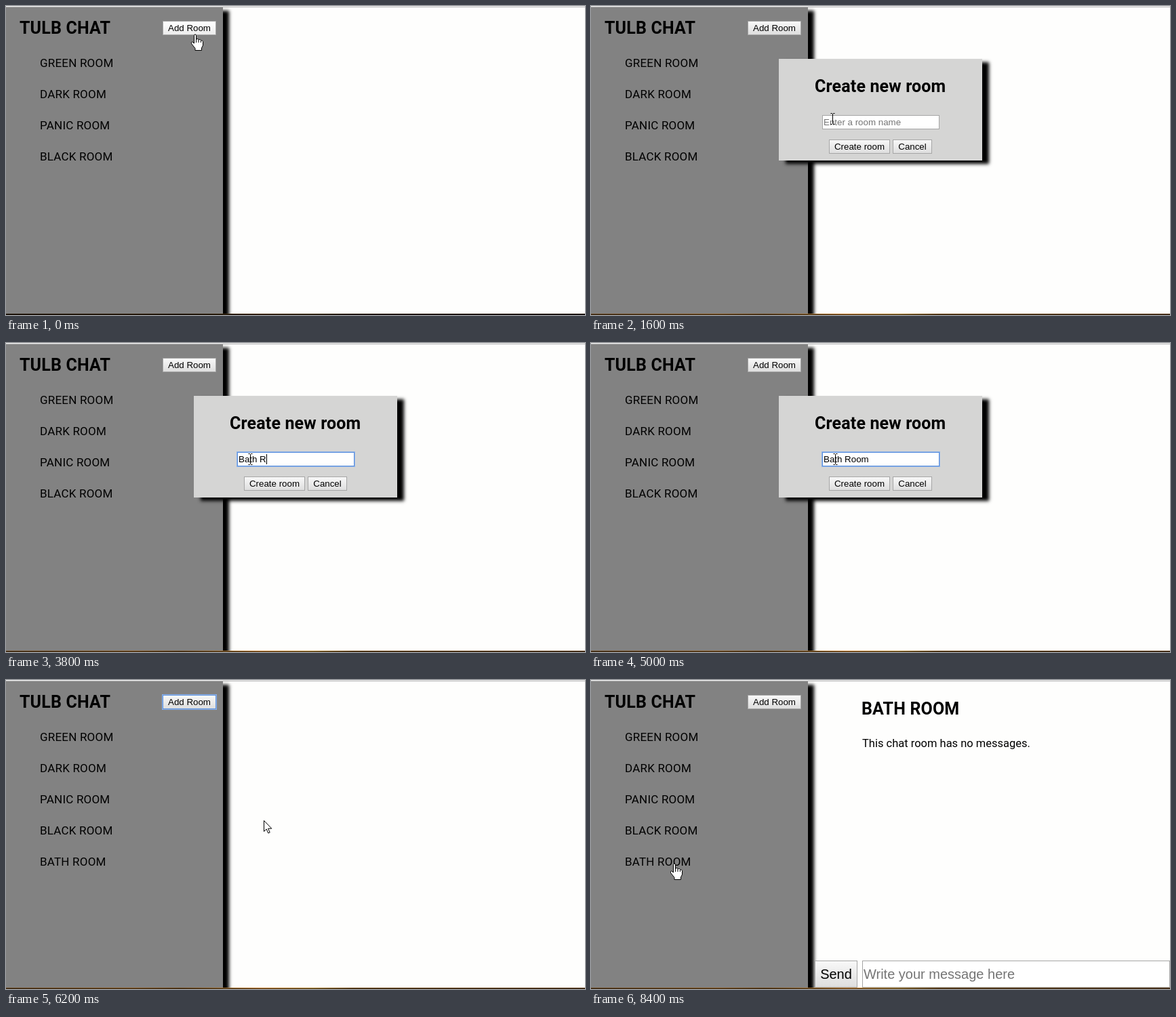
Write an HTML page that moves like this. It is 854x456 px and loops after 8800 ms.

```html
<!DOCTYPE html>
<html lang="en">
<head>
<meta charset="utf-8">
<title>Chat rooms</title>
<style>
html, body { margin: 0; width: 100%; height: 100%; overflow: hidden; background: #fefefd; }
body { position: relative; color: #000; }
body *, svg { position: absolute; box-sizing: border-box; white-space: pre; }
[hidden] { display: none; }

#topline { left: 0; top: 0; width: 854px; height: 2px; background: linear-gradient(#f4f4f4 50%, #b4b4b4 50%); }
#strip { left: 0; top: 454px; width: 854px; height: 2px;
  background: linear-gradient(transparent 50%, #0009 50%),
    linear-gradient(90deg, #6b4a26, #8a5c26 22%, #6e4a20 30%, #9a6a2c 38%, #c88438 44%, #b58a3c 53%, #7a5426 60%, #6b4a2a); }
#side { left: 0; top: 2px; width: 320px; height: 452px; background: #828282; box-shadow: 9px 5px 5px #000; }
#modal { left: 277px; top: 78px; width: 300px; height: 150px; background: #d5d5d4; box-shadow: 10px 5px 5px #000; }

h2, p { margin: 0; height: 20px; font: 17px/20px Roboto, sans-serif; }
h2 { font-weight: 600; font-size: 25px; letter-spacing: .15px; }
#side p { left: 50px; letter-spacing: .2px; }
#room p { font-size: 16.5px; }

.button, .field { font: 13.333px "Liberation Sans", Arial, sans-serif; border: 1px solid #a6a6a6; display: flex; align-items: center; }
.button { justify-content: center; background: linear-gradient(#f8f8f8, #dedede); }
.button.lit { background: linear-gradient(#fff, #ececec); }
.button.down { background: linear-gradient(#d8d8d8, #efefef); }
.field { background: #fff; padding-left: 1px; }
.field span { position: static; }
.empty { color: #757575; }
.focus { border-color: #5b8fdc; box-shadow: 0 0 0 1px #8fb3e8; }
.big { font-size: 20px; }
#caret { top: 86px; width: 1px; height: 15px; background: #000; }
#cursors svg { left: 0; top: 0; overflow: visible; }
</style>
</head>
<body>
<div id="topline"></div>
<div id="side">
  <h2 style="left:20px;top:21px">TULB CHAT</h2>
  <div id="add" class="button" style="left:231px;top:20px;width:79px;height:21px">Add Room</div>
</div>
<div id="room">
  <h2 style="left:399px;top:33px">BATH ROOM</h2>
  <p style="left:400px;top:84px">This chat room has no messages.</p>
  <div class="button big" style="left:330px;top:414px;width:63px;height:40px">Send</div>
  <div class="field big empty" style="left:400px;top:414px;width:454px;height:40px">Write your message here</div>
</div>
<div id="modal">
  <h2 style="left:53px;top:31px">Create new room</h2>
  <div id="name" class="field" style="left:64px;top:83px;width:173px;height:21px"><span id="typed"></span></div>
  <div id="caret"></div>
  <div id="create" class="button" style="left:74px;top:119px;width:90px;height:21px">Create room</div>
  <div class="button" style="left:168px;top:119px;width:58px;height:21px">Cancel</div>
</div>
<div id="strip"></div>
<div id="cursors">
  <svg id="hand" width="1" height="1" fill="#fff" stroke="#000" stroke-linejoin="round">
    <path d="M-1.5 13V1.5Q-1.5 0 0 0T1.5 1.5V8Q2 6 3.8 6.5T5 8.5Q6 6.8 7.4 7.5T8.4 9.5Q9.5 8.3 10.7 9.4T11.5 12V16L9.5 20V23.5H0V20.5L-5.5 13.5Q-6 11-4.5 10.8Z"/>
    <path d="M1.5 7V12M5 8.5V12M8.4 9.5V12" fill="none"/>
  </svg>
  <svg id="arrow" width="1" height="1" fill="#fff" stroke="#000">
    <path d="M.5 .5V16.5L4.2 13L6.8 19L9.2 18L6.6 12.2H11.8Z"/>
  </svg>
  <svg id="beam" width="1" height="1" fill="none" stroke="#000">
    <path d="M-2.5-7.5H-.5L.5-6.5L1.5-7.5H3.5M.5-6.5V7M-2.5 8.5H-.5L.5 7.5L1.5 8.5H3.5"/>
  </svg>
</div>
<script>
const LOOP = 8800;
const $ = id => document.getElementById(id);

// [time, cursor, x, y] of the pointer's hot spot
const pointer = [
  [0, 'hand', 279, 42], [200, 'hand', 277, 34], [400, 'hand', 275, 26],
  [1000, 'arrow', 284, 50], [1200, 'arrow', 310, 95], [1400, 'arrow', 338, 140],
  [1600, 'beam', 356, 166], [1800, 'beam', 360, 171],
  [5400, 'beam', 364, 177], [5600, 'arrow', 373, 196], [5800, 'arrow', 380, 207],
  [6600, 'arrow', 345, 214], [6800, 'arrow', 255, 236], [7000, 'arrow', 165, 260],
  [7200, 'hand', 123, 271]
];
// [time, letters typed]
const typing = [[0, 0], [2400, 1], [2600, 2], [3000, 3], [3200, 4], [3800, 6], [4200, 8], [4400, 9]];

const latest = (keys, t) => keys.filter(key => key[0] <= t).pop();
const between = (t, from, to) => t >= from && t < to;

const rooms = ['GREEN', 'DARK', 'PANIC', 'BLACK', 'BATH'].map((name, i) => {
  const item = document.createElement('p');
  item.textContent = name + ' ROOM';
  item.style.top = 72 + 46 * i + 'px';
  $('side').append(item);
  return item;
});

function draw(t) {
  const [, kind, x, y] = latest(pointer, t);
  for (const cursor of $('cursors').children) {
    cursor.style.display = cursor.id === kind ? 'block' : 'none';
    cursor.style.transform = `translate(${x}px, ${y}px)`;
  }

  $('modal').hidden = !between(t, 800, 6200);
  $('room').hidden = t < 7600;
  rooms[4].hidden = t < 6200;
  $('strip').style.filter = t < 200 ? 'brightness(.4)' : '';

  const text = 'Bath Room'.slice(0, latest(typing, t)[1]);
  const focused = between(t, 1800, 6000);
  $('typed').textContent = text || 'Enter a room name';
  $('name').classList.toggle('empty', !text);
  $('name').classList.toggle('focus', focused);
  $('caret').hidden = !focused || between(t, 2200, 2400) || t >= 5000;
  $('caret').style.left = 66 + (text ? $('typed').offsetWidth : 0) + 'px';

  $('add').classList.toggle('lit', t < 400);
  $('add').classList.toggle('down', between(t, 400, 800));
  $('add').classList.toggle('focus', between(t, 6200, 7400));
  $('create').classList.toggle('lit', between(t, 5800, 6000));
  $('create').classList.toggle('down', between(t, 6000, 6200));
}

const start = performance.now();
function tick() {
  draw((performance.now() - start) % LOOP);
  requestAnimationFrame(tick);
}
tick();
</script>
</body>
</html>
```
